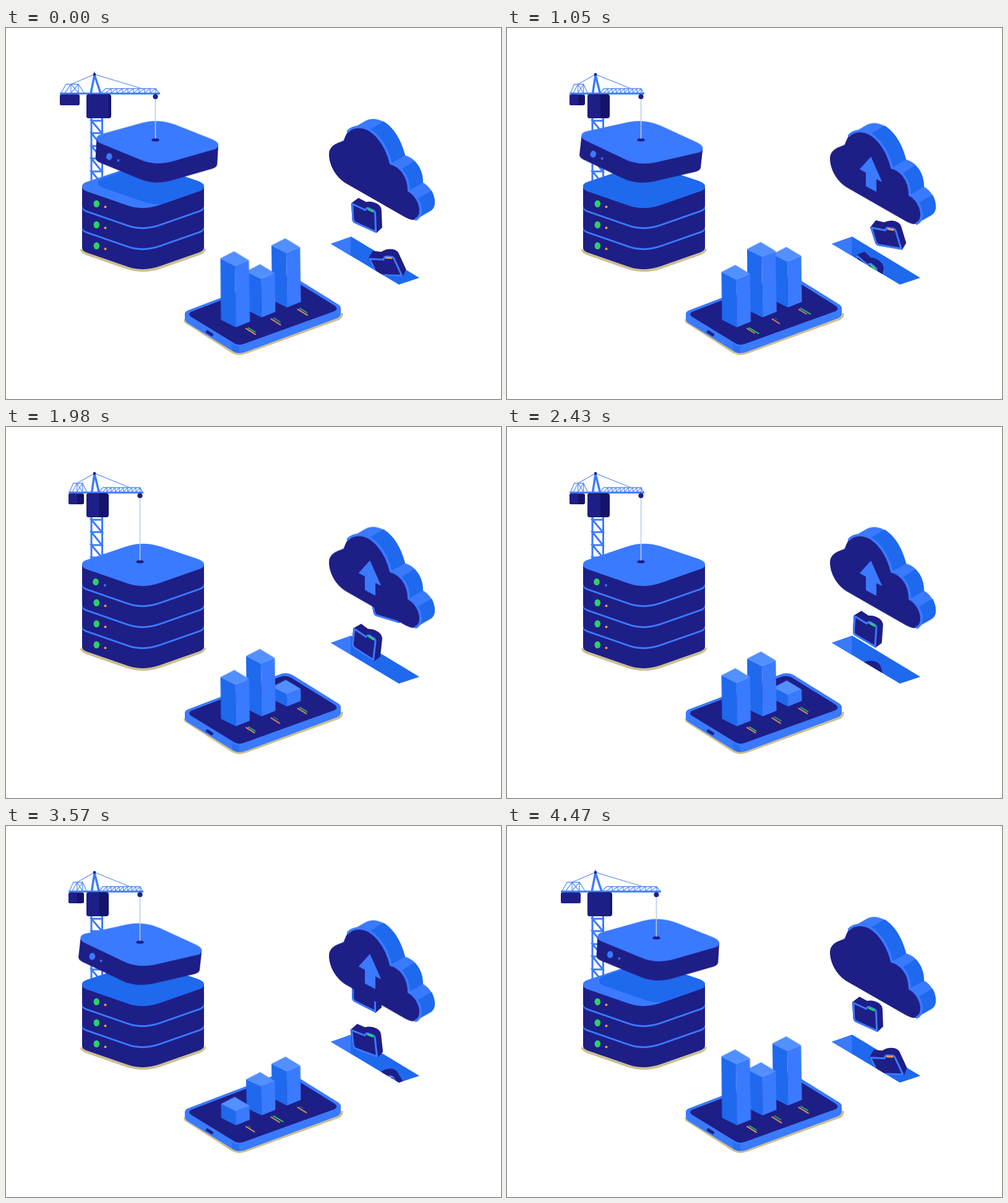
Recreate the animation shown at these times as an HTML page. Size 800 by 600 pixels, loop 4.5 s.

```html
<!DOCTYPE html>
<html lang="en">
<head>
<meta charset="utf-8">
<title>Cloud infrastructure</title>
<style>
  html, body { margin: 0; width: 100%; height: 100%; overflow: hidden; background: #fff; }
  svg { display: block; width: 100vw; height: 100vh; }

  .dark { fill: #1e1e87; }
  .deep { fill: #14146a; }
  .mid { fill: #1e69ee; }
  .light { fill: #3a7aff; }
  .pale { fill: #5290ff; }
  .green { fill: #2bd166; }
  .orange { fill: #f0a030; }
  .line { fill: none; stroke: #3a7aff; }
  .thin { stroke: #5c90f4; stroke-width: 1.3; }
  .tan { fill: none; stroke: #cbbf91; }
  .key { fill: none; stroke-width: 2; stroke-linecap: round; }

  .anim { animation: 4500ms cubic-bezier(.364, 0, .636, 1) infinite; }
  .jib { animation-name: swing; transform-origin: 143px 106px; }
  .jib * { vector-effect: non-scaling-stroke; }
  .trolley { animation-name: trolley; }
  .load { animation-name: load; }
  .tilt { animation-name: tilt; transform-origin: 216.5px 218px; }
  .shade { animation-name: shade; }
  .cab { animation-name: cab; }
  .cab-front { animation-name: cab-front; }
  .weight { animation-name: weight; }
  .weight-front { animation-name: weight-front; }
  .led { animation-name: led; animation-timing-function: step-end; }
  .dot { animation-name: dot; animation-timing-function: step-end; }
  .cloud { animation-name: bob; }
  .arrow { animation-name: arrow; }
  .bar1 { animation-name: bar1; }
  .bar2 { animation-name: bar2; }
  .bar3 { animation-name: bar3; }
  .key path { transform-box: view-box; transform-origin: 0 0; }
  .key1 { animation-name: key1; }
  .key2 { animation-name: key2; }
  .key3 { animation-name: key3; }
  .keyo { animation-name: keyo; }
  .folder { animation: rise 4500ms var(--rise, linear) var(--d) infinite; }
  .folder > g { rotate: var(--r); animation: turn 4500ms var(--turn, cubic-bezier(.2, .2, .4, 1)) var(--d) infinite; }

  @keyframes swing { 0%, 100% { transform: scaleX(1); } 22.2%, 83.3% { transform: scaleX(.745); } }
  @keyframes trolley { 0%, 100% { transform: translateX(25px); } 22.2%, 83.3% { transform: translateX(0); } }
  @keyframes load {
    0%, 24.4%, 84.4%, 100% { transform: translateY(-37px); }
    42.2%, 66.7% { transform: translateY(0); }
  }
  @keyframes tilt {
    0%, 100% { transform: translate(-1.5px, -1.5px) rotate(3.2deg); }
    22.2%, 35%, 79%, 83.3% { transform: translate(-2.5px, -1.5px) rotate(6.3deg); }
    42.2%, 71.5% { transform: none; }
  }
  @keyframes shade {
    0%, 100% { transform: translate(26px, -6px); opacity: 1; }
    22.2%, 40%, 69%, 83.3% { transform: none; opacity: 1; }
    42.2%, 66.7% { transform: none; opacity: 0; }
  }
  @keyframes cab { 0%, 100% { width: 40px; } 22.2%, 83.3% { width: 36px; } }
  @keyframes cab-front { 0%, 100% { width: 36px; } 22.2%, 83.3% { width: 21px; } }
  @keyframes weight { 0%, 100% { x: 87px; width: 32px; } 22.2%, 83.3% { x: 101px; width: 25px; } }
  @keyframes weight-front { 0%, 100% { x: 87px; width: 32px; } 22.2%, 83.3% { x: 101px; width: 14px; } }
  @keyframes led { 0%, 70%, 100% { fill: #3a7aff; } 44% { fill: #2bd166; } }
  @keyframes dot { 0%, 60%, 100% { fill: #3a7aff; } 56% { fill: #f0a030; } }
  @keyframes bob { 0%, 100% { transform: none; } 50% { transform: translateY(15px); } }
  @keyframes arrow { 0%, 7%, 94%, 100% { opacity: 0; } 15%, 83% { opacity: 1; } }
  @keyframes rise { from { translate: 0 var(--y, 447.5px); } to { translate: 0 233.5px; } }
  @keyframes turn { to { rotate: 0deg; } }

  @keyframes bar1 {
    0%, 100% { transform: translate(-1.4px, -99.5px); }
    23.33% { transform: translate(-1.1px, -77.5px); }
    36% { transform: translate(-.9px, -65.5px); }
    54% { transform: translate(-1px, -70.5px); }
    65.33% { transform: translate(-.4px, -25.5px); }
    79.33% { transform: translate(-.3px, -22.5px); }
  }
  @keyframes bar2 {
    0%, 100% { transform: translate(-.9px, -62.5px); }
    23.33% { transform: translate(-1.4px, -98.5px); }
    36% { transform: translate(-1.2px, -88.5px); }
    54% { transform: translate(-1.1px, -81.5px); }
    65.33% { transform: translate(-.6px, -43.5px); }
    79.33% { transform: translate(-.7px, -46.5px); }
  }
  @keyframes bar3 {
    0%, 100% { transform: translate(-1.2px, -88.5px); }
    23.33% { transform: translate(-1px, -74.5px); }
    36% { transform: translate(-.3px, -20.5px); }
    54% { transform: translate(-.3px, -18.5px); }
    65.33% { transform: translate(-.8px, -59.5px); }
    79.33% { transform: translate(-.8px, -55.5px); }
  }
  @keyframes key1 { 0%, 36%, 54%, 100% { transform: scale(.75); } 23.33% { transform: scale(1); } 65.33%, 79.33% { transform: scale(.35); } }
  @keyframes key2 { 0%, 54%, 65.33%, 100% { transform: scale(.7); } 23.33%, 36% { transform: scale(.3); } 79.33% { transform: scale(1); } }
  @keyframes key3 { 0%, 36%, 54%, 100% { transform: scale(.76); } 23.33% { transform: scale(1); } 65.33%, 79.33% { transform: scale(.35); } }
  @keyframes keyo { 0%, 100% { transform: scale(1); } 23.33% { transform: scale(.8); } 36%, 79.33% { transform: scale(.9); } }
</style>
</head>
<body>
<svg viewBox="0 0 800 600">
  <defs>
    <path id="top" d="M123 222C123 218 127 216 133 214L195 193Q221 184.5 249 193L309 213C316 216 320 218 320 222C320 227 316 229 309 231L249 252Q221 262 195 252.5L133 231C127 229 123 227 123 222Z"/>
    <g id="slab">
      <path class="dark" d="M123 222V253C123 258 127 260 133 262L195 283.5Q221 293 249 283L309 262C316 260 320 257 320 253V222Z"/>
      <use href="#top" class="light"/>
    </g>
    <g id="server">
      <use href="#slab"/>
      <ellipse class="green" cx="146.3" cy="250.3" rx="4.8" ry="5.8"/>
      <circle class="orange" cx="160.5" cy="255.3" r="2"/>
    </g>
    <g id="column">
      <path class="mid" d="M-24-12L0 0L1.5 110L-22.5 98Z"/>
      <path class="light" d="M22.5-9L0 0L1.5 110L24 101Z"/>
      <path class="pale" d="M-24-12L-1.5-23.5L22.5-9L0 0Z"/>
    </g>
    <g id="folder">
      <path class="dark" d="M-24-21L-12-29.5L0-22.5Q10-24 18.5-18.5Q24.5-14 24.5-8V20L15 28.5L-20 11Q-23.5 9-23.5 4Z"/>
      <path class="line" stroke-width="3" stroke-linejoin="round" d="M-22-20V4Q-22 8-19 10L14 26.5V-3Q14-7 11-8.5L4-12Q1-13.5-1-10.5L-2-9.5Z"/>
      <path fill="none" stroke="currentColor" stroke-width="3" d="M2-11L11.5-6"/>
    </g>
    <clipPath id="top-clip"><use href="#top"/></clipPath>
    <clipPath id="rope-clip"><path d="M190 113H270V240H190Z"/></clipPath>
    <clipPath id="base-clip"><path d="M-40-200H40V-16L0 0L-40-20Z"/></clipPath>
    <clipPath id="slot-clip"><path d="M500 100V349H525L635 415L668 404H720V100Z"/></clipPath>
  </defs>

  <!-- crane -->
  <path class="line" stroke-width="3" d="M138 146V252M155.5 146V252M138 150H155L138 150L155 170H138L155 191H138L155 211H138L155 232H138L155 252"/>
  <g class="jib anim line">
    <g class="thin">
      <path d="M105 91L143 75L220 98"/>
      <path d="M89 105L97 91H117L126 105M95 105L105 91V105M105 91L117 105V91L105 105"/>
      <path d="M154 105L161 98H242L247 105M161 105L170 98V105L179 98V105L188 98V105L197 98V105L206 98V105L215 98V105L224 98V105L233 98V105L242 98V105"/>
    </g>
    <path stroke-width="3.5" d="M137 106L143 76L153 106"/>
    <path stroke-width="3.2" d="M87 106H249"/>
  </g>
  <circle class="dark" cx="143" cy="75" r="2.3"/>
  <rect class="deep weight anim" x="87" y="107.5" width="32" height="17.5" rx="3"/>
  <rect class="dark weight-front anim" x="87" y="107.5" width="32" height="17.5" rx="3"/>
  <rect class="deep cab anim" x="130" y="107" width="40" height="39" rx="4"/>
  <rect class="dark cab-front anim" x="130" y="107" width="36" height="39" rx="4"/>

  <!-- server stack -->
  <path class="tan" stroke-width="5" d="M122 358C123 362 127 364 133 366L195 387.5Q221 396 249 387L309 366C316 364 320 361 321 357"/>
  <use href="#server" y="102"/>
  <use href="#server" y="68"/>
  <use href="#server" y="34"/>
  <g transform="translate(0 34)" clip-path="url(#top-clip)">
    <use href="#top" class="mid shade anim"/>
  </g>

  <!-- hanging server -->
  <g class="trolley anim">
    <g class="load anim">
      <g class="tilt anim">
        <use href="#slab"/>
        <ellipse class="led anim" cx="145" cy="250.5" rx="4.8" ry="5.8"/>
        <circle class="dot anim" cx="160" cy="256" r="1.9"/>
      </g>
      <path class="dark" d="M210 219Q211 215 216.5 215T223 219Q216.5 222 210 219Z"/>
    </g>
    <g clip-path="url(#rope-clip)">
      <path class="load anim" fill="none" stroke="#bcc8ee" stroke-width="1.6" d="M216.5 100V216"/>
    </g>
    <circle class="dark" cx="216.5" cy="111" r="4.1"/>
  </g>

  <!-- tablet -->
  <path class="tan" stroke-width="4" stroke-linejoin="round" d="M289 471L290 475L367 524.5Q377 529 387 525L538 470Q543 467 543 461"/>
  <path class="light" d="M289 462V470Q289 474 293 477L367 523Q377 528 387 524L536 469Q541 466 541 462V453Z"/>
  <path class="mid" d="M364 510L377 514V526Q371 526 366 522Z" opacity=".6"/>
  <path class="light" d="M293 457L440 401Q452 395 463 401L537 447Q545 453 537 458L387 512Q377 517 367 512L293 468Q285 462 293 457Z"/>
  <path class="dark" d="M299 459L443 404Q452 401 460 405L531 449Q538 454 531 458L384 511Q377 513.5 370 510.5L299 467Q293 463 299 459Z"/>
  <path fill="none" stroke="#1e1e87" stroke-width="5" stroke-linecap="round" d="M325.5 491.5L332.5 496"/>

  <!-- chart -->
  <g transform="translate(454 452)" clip-path="url(#base-clip)"><use href="#column" class="bar3 anim"/></g>
  <g transform="translate(413 468)" clip-path="url(#base-clip)"><use href="#column" class="bar2 anim"/></g>
  <g transform="translate(371.5 484)" clip-path="url(#base-clip)"><use href="#column" class="bar1 anim"/></g>
  <g class="key" stroke="#2bd166">
    <g transform="translate(391.5 485)"><path class="key1 anim" d="M0 0L15 9"/></g>
    <g transform="translate(432.5 469)"><path class="key2 anim" d="M0 0L15 9"/></g>
    <g transform="translate(475 453.5)"><path class="key3 anim" d="M0 0L15 9"/></g>
  </g>
  <g class="key" stroke="#f0a050">
    <g transform="translate(388 486)"><path class="keyo anim" d="M0 0L15 9.5"/></g>
    <g transform="translate(428.5 470.5)"><path class="keyo anim" d="M0 0L15 9.5"/></g>
    <g transform="translate(471.5 455)"><path class="keyo anim" d="M0 0L15.5 9.5"/></g>
  </g>

  <!-- slot and rising folders -->
  <path class="mid" d="M525 349L558 337.5L668 404L635 415Z"/>
  <path class="light" d="M525 349L557.5 337.5L557 368Z"/>
  <g clip-path="url(#slot-clip)">
    <g transform="translate(582.7 0)" color="#2bd166">
      <g class="folder" style="--d:-3023ms;--r:-23deg"><g><use href="#folder"/></g></g>
      <g class="folder" style="--d:-4592ms;--r:23deg"><g><use href="#folder"/></g></g>
    </g>
    <g transform="translate(616 0)" color="#f0a050">
      <g class="folder" style="--d:-1230ms;--r:-34deg;--y:428px;--rise:cubic-bezier(.4,.3,.7,.72);--turn:linear"><g><use href="#folder"/></g></g>
    </g>
  </g>

  <!-- cloud -->
  <g class="cloud anim">
    <path class="light" d="M527 193L546 181L552 167L576 153C582 149 587 147 593 147C616 147 637 173 645 206C658 209 674 224 674 250C685 256 693 270 693 282C693 289 690 294 684 297L661 310L560 220Z"/>
    <g class="mid">
      <path d="M587.3 164.8C603.6 174.2 616.8 195.8 622 219L645 206C639 181 626 160 610 151Z"/>
      <path d="M640 228C647 235 651 248 651 263L674 250C674 234 668 223 660 215Z"/>
      <path d="M665 276C669 283 670 289 670 295C670 303 667 308 661 310L684 297C690 294 693 289 693 282C693 275 691 269 688 263Z"/>
    </g>
    <path class="dark" d="M522 204C522 193 531 186 546 183C549 169 558 160 570 160C593 160 614 186 622 219C635 222 651 237 651 263C662 269 670 283 670 295C670 305 664 312 655 310Q651 309 645 306L549 251C533 241 522 222 522 204Z"/>
    <path class="line" stroke-width="4" d="M552 168C556 163 563 160 570 160C593 160 614 186 622 219C635 222 651 237 651 263C662 269 670 283 670 295C670 303 667 308 661 310"/>
    <path class="light arrow anim" stroke="#3a7aff" stroke-linejoin="round" d="M588 202L605.5 241.5L596.5 237V257.5L580.5 249V227L570.5 221.5Z"/>
  </g>
</svg>
</body>
</html>
```
